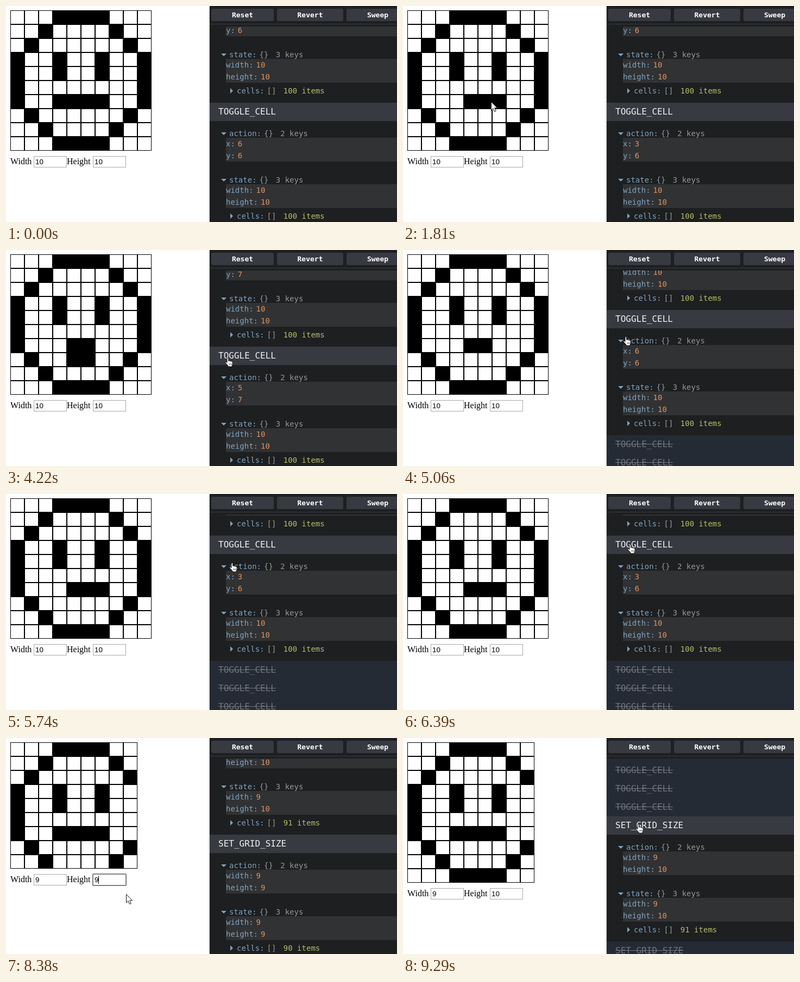
An HTML page that plays this animation: 720x400 px, repeating every 9540 ms.

```html
<!DOCTYPE html>
<html lang="en">
<head>
<meta charset="utf-8">
<title>Cell editor with action log</title>
<style>
  html, body { margin: 0; width: 100%; height: 100%; overflow: hidden; background: #fff; }
  #stage { position: relative; width: 720px; height: 400px; overflow: hidden; background: #fff; }
  #stage div, #stage svg, .label { position: absolute; box-sizing: border-box; white-space: pre; }

  .cell { width: 26px; height: 26px; border: 1px solid #000; }
  .cell.on { background: #000; }

  #form { left: 0; top: 0; width: 375px; height: 400px; }
  .label { top: 278px; font: 16px/20px "Liberation Serif", "Times New Roman", serif; color: #000; }
  .field { top: 278px; width: 61px; height: 21px; border: 1px solid #a9a9a9; background: #fff;
    font: 13.333px/19px "Liberation Sans", Arial, sans-serif; color: #000; padding-left: 2px; }
  .field.focus { border-color: #8b938d; border-radius: 1px; box-shadow: 0 0 0 1px #6c756f; }
  .field i { display: none; position: absolute; top: 2px; width: 1px; height: 15px; background: #000; }
  .field.focus i { display: inline-block; }
  .field svg { display: none; left: 43px; top: 2px; }
  .field.hover svg { display: block; }

  #panel { left: 375px; top: 0; width: 345px; height: 400px; background: #1d1f21;
    box-shadow: -1px 0 3px rgba(0, 0, 0, .25); font: 14px/22px "DejaVu Sans Mono", monospace; }
  #bar { left: 0; top: 0; width: 345px; height: 34px; border-bottom: 1px solid #3b3d41; overflow: hidden; }
  #bar div { top: 5px; height: 23px; border-radius: 3px; background: #383a42; color: #fff;
    font: bold 13px/23px "DejaVu Sans Mono", monospace; text-align: center; }
  #view { left: 0; top: 38px; width: 345px; height: 362px; overflow: hidden; }
  #list { left: 0; bottom: -11px; width: 345px; }
  #stage .entry { position: relative; height: 232px; }
  #stage .entry.off { height: 34px; background: #252b35; }
  .head { left: 0; top: 0; width: 345px; height: 34px; padding-left: 16px; background: #383a42;
    color: #f2f2f2; font-size: 16px; line-height: 34px; }
  .off .head { background: none; color: #70757c; text-decoration: line-through; }
  .node { left: 36px; height: 22px; color: #969896; }
  .props { left: 30px; width: 315px; height: 44px; background: #313234; }
  .node b, .props b { font-weight: normal; color: #81a2be; margin-right: 5px; }
  .props { color: #de935f; }
  .node em { font-style: normal; margin-left: 13.4px; }
  .node em.items { color: #b5bd68; }
  .down { left: 21px; border: 5px solid transparent; border-top-color: #81a2be; border-bottom: 0; }
  .right { left: 38px; top: 205px; border: 5px solid transparent; border-left-color: #81a2be; border-right: 0; }
  #arrow, #hand { left: 0; top: 0; overflow: visible; }
</style>
</head>
<body>
<div id="stage">
  <div id="grid"></div>
  <div id="form"></div>
  <div id="panel">
    <div id="bar">
      <div style="left:3px;width:115px">Reset</div>
      <div style="left:124px;width:122px">Revert</div>
      <div style="left:252px;width:115px">Sweep</div>
    </div>
    <div id="view"><div id="list"></div></div>
  </div>
  <svg id="arrow" width="14" height="21">
    <path d="M.5 .5V16L4 12.8 6.5 18.6 9.2 17.4 6.7 11.8H11.6Z" fill="#fff" stroke="#111"/>
  </svg>
  <svg id="hand" width="16" height="19">
    <path d="M4 2Q4 .6 5.4 .6T6.8 2V6.5Q7 5.6 8.2 5.8T9.4 7Q10 6.2 11 6.5T12 7.6Q12.6 7 13.4 7.4T14.2 9V12Q14.2 14 13 15.5V17H6V15.5Q3.5 13 1 9.8Q.4 8.8 1.4 8.3T4 9.8Z"
      fill="#fff" stroke="#111"/>
    <path d="M8 11V14M10 11V14M12 11V14" stroke="#333" stroke-width=".8"/>
  </svg>
</div>
<script>
const LOOP = 9540, STEP = 40;
const $ = id => document.getElementById(id);

// Columns filled in each row of the face
const FACE = ['3456', '27', '18', '0369', '0369', '09', '034569', '18', '27', '3456'];

const toggle = (x, y) => ({ x, y });
const resize = (width, height, items) => ({ width, height, items });

// Log before the loop starts, then what is clicked and when
const HISTORY = [toggle(5, 6), toggle(6, 6)];
const EVENTS = [
  [1310, toggle(3, 6)],
  [2180, toggle(6, 6)],
  [2880, toggle(4, 7)],
  [3590, toggle(5, 7)],
  [4460, 'skip'],
  [5060, 'skip'],
  [5740, 'skip'],
  [6530, 'skip'],
  [7640, resize(9, 10, 91)],
  [8300, resize(9, 9, 90)],
  [8900, 'skip']
];

// Pointer path: time, x, y
const PATH = [
  [390, 238, 340], [1110, 93, 178],
  [1430, 93, 178], [1810, 162, 177], [2000, 171, 179],
  [2200, 171, 179], [2610, 124, 200],
  [2900, 124, 200], [3260, 147, 201],
  [3640, 147, 201], [4220, 408, 199], [4460, 424, 202],
  [4530, 424, 202], [4750, 410, 160],
  [5080, 410, 160], [5560, 416, 127],
  [5760, 416, 127], [6390, 418, 93],
  [6550, 418, 93], [7270, 108, 291],
  [7480, 108, 291], [7600, 109, 291],
  [7680, 109, 291], [8010, 217, 291],
  [8340, 217, 291], [8860, 431, 196],
  [8940, 431, 196], [9250, 434, 160], [9290, 433, 159]
];

function logAt(t) {
  const log = HISTORY.map(action => ({ action, off: false }));
  for (const [time, what] of EVENTS) {
    if (time > t) break;
    if (what === 'skip') log.findLast(e => !e.off).off = true;
    else log.push({ action: what, off: false });
  }
  let size = resize(10, 10, 100);
  for (const e of log) {
    if (!e.off && e.action.width) size = e.action;
    e.size = size;
  }
  return log;
}

const prop = (key, value) => `<b>${key}:</b>${value}`;
const props = (top, o, a, b) =>
  `<div class="props" style="top:${top}px">${prop(a, o[a])}\n${prop(b, o[b])}</div>`;
const node = (top, name, keys) =>
  `<div class="down" style="top:${top + 9}px"></div>` +
  `<div class="node" style="top:${top}px"><b>${name}:</b>{}<em>${keys} keys</em></div>`;

function entryHtml({ action, off, size }) {
  const sized = 'width' in action;
  const head = `<div class="head">${sized ? 'SET_GRID_SIZE' : 'TOGGLE_CELL'}</div>`;
  if (off) return `<div class="entry off">${head}</div>`;
  return `<div class="entry">${head}` +
    node(46, 'action', 2) + props(65, action, ...(sized ? ['width', 'height'] : ['x', 'y'])) +
    node(132, 'state', 3) + props(151, size, 'width', 'height') +
    `<div class="right"></div><div class="node" style="left:50px;top:199px">` +
    `<b>cells:</b>[]<em class="items">${size.items} items</em></div></div>`;
}

function gridHtml(log, { width, height }) {
  const on = FACE.map(row => Array.from({ length: 10 }, (_, x) => row.includes(x)));
  for (const { action: { x, y }, off } of log.slice(HISTORY.length))
    if (!off && x !== undefined) on[y][x] = !on[y][x];
  let html = '';
  for (let y = 0; y < height; y++)
    for (let x = 0; x < width; x++)
      html += `<div class="cell${on[y][x] ? ' on' : ''}" style="left:${8 + 26 * x}px;top:${8 + 26 * y}px"></div>`;
  return html;
}

const SPINNER = '<svg width="15" height="15"><rect width="15" height="15" rx="1" fill="#e4e4e0"/>' +
  '<path d="M3.5 6 7.5 2 11.5 6ZM3.5 9 7.5 13 11.5 9Z" fill="#4a4a4a"/></svg>';

const field = (id, left, labelLeft, name) =>
  `<span class="label" style="left:${labelLeft}px">${name}</span>` +
  `<div class="field" id="${id}" style="left:${left}px"><span></span><i></i>${SPINNER}</div>`;

$('form').innerHTML = field('w', 51, 8, 'Width') + field('h', 160, 112, 'Height');

function setField(id, value, focus, hover) {
  const el = $(id);
  el.firstChild.textContent = value;
  el.classList.toggle('focus', focus);
  el.classList.toggle('hover', hover);
}

function pointerAt(t) {
  const i = PATH.findLastIndex(p => p[0] <= t);
  if (i < 0) return null;
  const [t0, x0, y0] = PATH[i];
  const [t1, x1, y1] = PATH[i + 1] || [LOOP, x0, y0];
  const k = Math.floor((t - t0) / STEP) * STEP / (t1 - t0);
  const e = k * k * (3 - 2 * k);
  return [Math.round(x0 + (x1 - x0) * e), Math.round(y0 + (y1 - y0) * e)];
}

function place(id, show, x, y) {
  $(id).style.display = show ? 'block' : 'none';
  $(id).style.transform = `translate(${x}px, ${y}px)`;
}

let shown = -1;
function render(t) {
  const count = EVENTS.filter(e => e[0] <= t).length;
  const log = logAt(t);
  const { size } = log[log.length - 1];
  if (count !== shown) {
    shown = count;
    $('list').innerHTML = log.map(entryHtml).join('');
    $('grid').innerHTML = gridHtml(log, size);
    $('form').style.top = 26 * (size.height - 10) + 'px';
  }
  const [x, y] = pointerAt(t) || [-99, -99];
  const over = left => x >= left && x < left + 61 && y >= 278 && y < 299;
  setField('w', size.width, t >= 7270 && t < 8300, over(51));
  setField('h', size.height, t >= 8300 && t < 8900, over(160) && t < 8340);
  const hand = x > 375 && (t < 6570 || t > 8700);
  place('arrow', !hand, x, y);
  place('hand', hand, x - 5, y);
}

const start = performance.now();
function tick() {
  render((performance.now() - start) % LOOP);
  requestAnimationFrame(tick);
}
tick();
</script>
</body>
</html>
```
